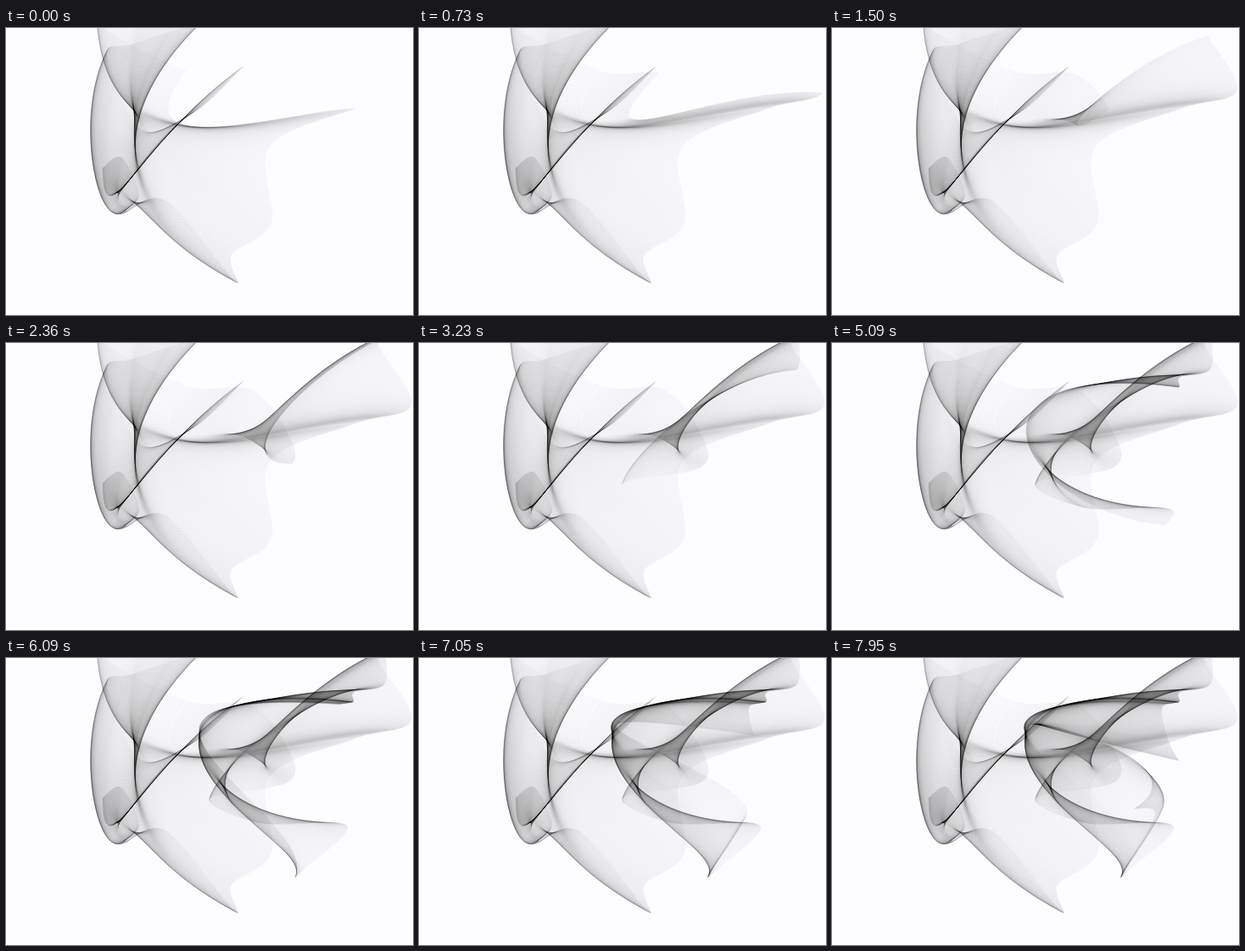
Recreate the animation shown at these times as an HTML page with a canvas. Size 480 px wide and 339 px high, loop 8 s.

```html
<!DOCTYPE html>
<html lang="en">
<head>
<meta charset="utf-8">
<title>Drifting curve</title>
<style>
  html, body { margin: 0; width: 100%; height: 100%; overflow: hidden; background: #fdfcfe; }
  canvas { display: block; width: 480px; height: 339px; }
</style>
</head>
<body>
<canvas id="stage"></canvas>
<script>
const W = 480, H = 339, LOOP = 8000, STEPS = 176, PER_STEP = 4;
const DT = LOOP / STEPS / PER_STEP;
const BEGIN = -7200;

// A point that wanders smoothly through evenly timed waypoints.
function wander(start, gap, points) {
  const at = i => points[Math.max(0, Math.min(points.length - 1, i))];
  return t => {
    const s = Math.max(0, (t - start) / gap), i = Math.floor(s), u = s - i;
    const [a, b, c, d] = [-1, 0, 1, 2].map(k => at(i + k));
    return [0, 1].map(k => b[k] + u / 2 * (c[k] - a[k]
      + u * (2 * a[k] - 5 * b[k] + 4 * c[k] - d[k]
      + u * (3 * (b[k] - c[k]) + d[k] - a[k]))));
  };
}

// The ends of the curve move twice as briskly as its two handles.
const head = wander(BEGIN, 800, [
  [114, 165], [136, 153], [157, 196], [142, 216], [190, 205],
  [270, 299], [266, 268], [313, 230], [311, 140], [412, 95],
  [478, 73], [440, 4], [447, -6], [446, 31], [411, 40],
  [410, 51], [404, 53], [389, 60], [397, 98], [410, 123]
]);
const tail = wander(BEGIN, 800, [
  [280, 45], [224, 98], [160, 120], [119, 32], [152, 18],
  [236, -12], [215, -30], [165, -35], [108, -8], [213, 50],
  [288, 55], [330, 102], [334, 146], [240, 166], [300, 195],
  [402, 198], [352, 249], [342, 254], [381, 185], [354, 178]
]);
const headPull = wander(BEGIN + 800, 1600, [
  [115, 258], [107, 245], [105, 215], [160, 150], [330, 98],
  [342, 35], [350, 38], [160, 15], [15, 35], [8, 28]
]);
const tailPull = wander(BEGIN + 800, 1600, [
  [155, 135], [80, 105], [125, 90], [118, 120], [125, 165],
  [232, 162], [250, 130], [192, 195], [415, 182], [483, 98]
]);

const canvas = document.getElementById('stage');
const ctx = canvas.getContext('2d');
const scale = window.devicePixelRatio || 1;
canvas.width = W * scale;
canvas.height = H * scale;
ctx.scale(scale, scale);

function drawCurve(t) {
  ctx.beginPath();
  ctx.moveTo(...head(t));
  ctx.bezierCurveTo(...headPull(t), ...tailPull(t), ...tail(t));
  ctx.stroke();
}

function drawPast() {
  ctx.fillStyle = '#fdfcfe';
  ctx.fillRect(0, 0, W, H);
  ctx.strokeStyle = 'rgba(0,0,0,0.05)';
  ctx.lineWidth = 0.8;
  for (let t = BEGIN; t <= 0; t += DT) drawCurve(t);
}

let drawn = Infinity;

function render(ms) {
  const count = Math.floor((ms % LOOP) / LOOP * STEPS) * PER_STEP;
  if (count < drawn) {
    drawPast();
    drawn = 0;
  }
  while (drawn < count) drawCurve(++drawn * DT);
}

const start = performance.now();
function tick() {
  render(performance.now() - start);
  requestAnimationFrame(tick);
}
tick();
</script>
</body>
</html>
```
